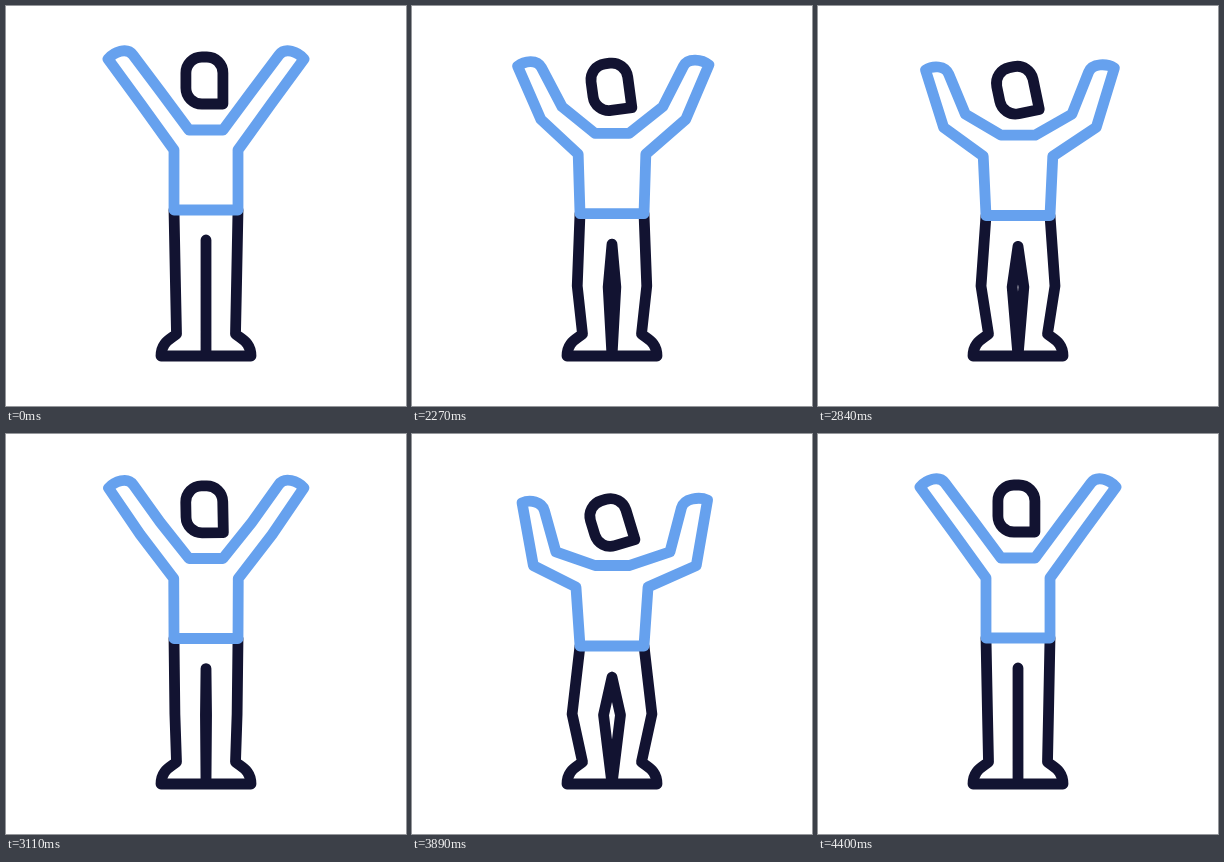
Write an HTML page that moves like this. It is 400 by 400 pixels and loops after 4.46 s.

```html
<!DOCTYPE html>
<html lang="en">
<head>
<meta charset="utf-8">
<title>Cheering figure</title>
<style>
  html, body { margin: 0; width: 100%; height: 100%; overflow: hidden; background: #fff; }
  svg { display: block; width: 100vw; height: 100vh; }
  path { fill: none; stroke-width: 10.8; stroke-linecap: round; stroke-linejoin: round; }
  .dark { stroke: #121331; }
  .blue { stroke: #66a1ee; }
</style>
</head>
<body>
<svg viewBox="0 0 400 400">
  <path id="head" class="dark" d="M18.5 23.5H-2.5A16 16 0 0 1 -18.5 7.5V-7.5A16 16 0 0 1 -2.5 -23.5H2.5A16 16 0 0 1 18.5 -7.5Z"/>
  <path id="legs" class="dark"/>
  <path id="shirt" class="blue"/>
</svg>
<script>
  const LOOP = 4460, REST = 2000, SWING = 600, STEP = 30;
  const MID = 200, FLOOR = 350;

  const [head, legs, shirt] = ['head', 'legs', 'shirt'].map(id => document.getElementById(id));

  // Half of the shirt, from the middle of the hem to the middle of the neck.
  // Each joint moves in a straight line; the arms sway slightly to the right.
  function halfShirt(side, k) {
    const joint = (x, y, dx, dy, sway = 0, tilt = 0) =>
      [MID + side * (x + dx * k) + sway * k, y + (dy - side * tilt) * k];
    const hem = joint(32, 204, 0, 8.5);
    const shoulder = joint(32, 144, 4.3, 9.6);
    const outerElbow = joint(65, 98.2, 17.5, 35.6, 3);
    const tip = joint(98, 53, -5.6, 15.5, 3, 1.5);
    const knuckle = joint(92, 46, -7.5, 19, 3, 1.5);
    const palm = joint(73, 49, -4.8, 28, 1, 1.5);
    const innerElbow = joint(45, 86.3, 12.8, 33.7, 1);
    const neck = joint(17, 124, 0, 8);
    const fingers = palm.map((v, i) => v + 0.22 * (v - innerElbow[i]));
    return `M${MID} ${hem[1]}L${[hem, shoulder, outerElbow, tip]}` +
      `C${[knuckle, fingers, palm]}L${[innerElbow, neck]}H${MID}`;
  }

  // One leg with its foot, and the inner seam that opens at the knee.
  function leg(side, k) {
    const x = d => MID + side * d;
    return `M${x(32)} ${204 + 8.5 * k}L${x(30.5 + 10 * k)} 280L${x(29.5)} 328` +
      `C${x(35)} 333 ${x(45)} 336 ${x(45)} ${FLOOR}H${MID}` +
      `L${x(9 * k)} 281L${MID} ${234 + 9.8 * k}`;
  }

  // 0 = stretched, 1 = crouched; two eased dips after the rest.
  function dip(ms) {
    if (ms <= REST || ms >= REST + 4 * SWING) return 0;
    const t = Math.floor((ms - REST) / STEP) * STEP / SWING % 2;
    const u = t < 1 ? t : 2 - t;
    return u * u * (3 - 2 * u);
  }

  function draw(ms) {
    const k = dip(ms);
    const bothSides = half => half(-1, k) + half(1, k);
    head.setAttribute('transform', `translate(198.4 ${74.5 + 14.9 * k}) rotate(${-18 * k})`);
    legs.setAttribute('d', bothSides(leg));
    shirt.setAttribute('d', bothSides(halfShirt));
  }

  const start = performance.now();
  function tick() {
    draw((performance.now() - start) % LOOP);
    requestAnimationFrame(tick);
  }
  tick();
</script>
</body>
</html>
```
